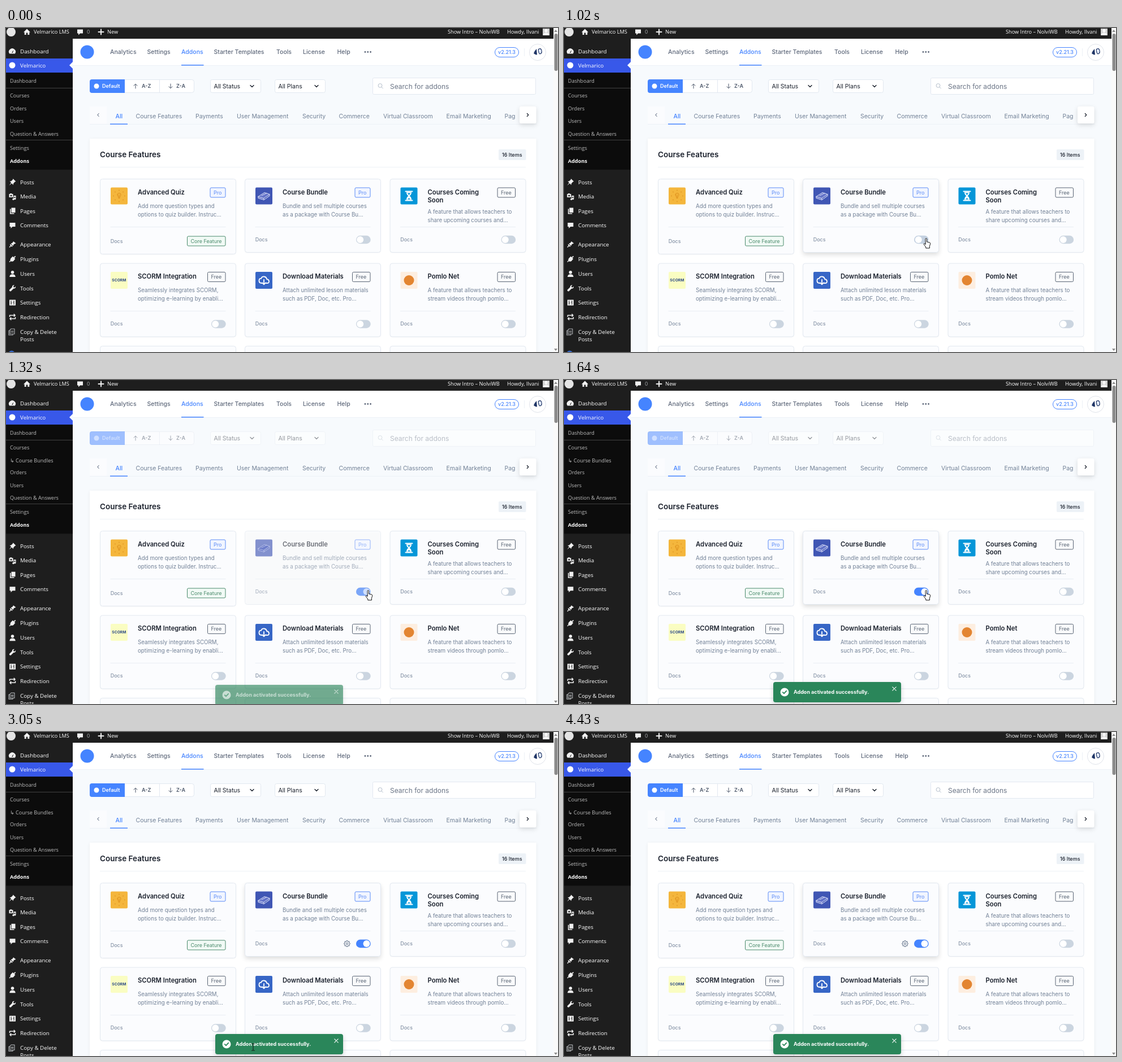
Animation, 976 px wide and 574 px high, one loop 4.5 s. Source, as an HTML page with a canvas:

```html
<!DOCTYPE html>
<html lang="en">
<head>
<meta charset="utf-8">
<title>Addons</title>
<style>
html, body { margin: 0; width: 100%; height: 100%; overflow: hidden; background: #f7fafd; }
canvas { display: block; width: 976px; height: 574px; }
</style>
</head>
<body>
<canvas id="stage"></canvas>
<script>
const W = 976, H = 574, LOOP = 4500;
const INTER = 'Inter, "Liberation Sans", sans-serif';
const ADMIN = '"Open Sans", "Noto Sans", sans-serif';
const BLUE = '#4584ff', INK = '#1a202c', GRAY = '#718096', LINE = '#e2e8f0', OFF = '#cbd5e0';

const canvas = document.getElementById('stage');
const dpr = window.devicePixelRatio || 1;
canvas.width = W * dpr;
canvas.height = H * dpr;
const g = canvas.getContext('2d');

const clamp = v => Math.max(0, Math.min(1, v));
const ramp = (t, from, to) => clamp((t - from) / (to - from));
const smooth = p => p * p * (3 - 2 * p);

// y is the middle of the capital letters
function text(s, x, y, size, color, weight = 400, family = INTER) {
  g.font = `${weight} ${size}px ${family}`;
  g.fillStyle = color;
  g.fillText(s, x, y + size * 0.36);
}
const admin = (s, x, y, size = 9.8, color = '#fff', weight = 400) =>
  text(s, x, y, size, color, weight, ADMIN);

function rect(x, y, w, h, fill) {
  g.fillStyle = fill;
  g.fillRect(x, y, w, h);
}
function box(x, y, w, h, r, fill, stroke) {
  g.beginPath();
  g.roundRect(x, y, w, h, r);
  if (fill) { g.fillStyle = fill; g.fill(); }
  if (stroke) { g.strokeStyle = stroke; g.lineWidth = 1; g.stroke(); }
}
function disc(x, y, r, fill, stroke) {
  g.beginPath();
  g.arc(x, y, r, 0, Math.PI * 2);
  if (fill) { g.fillStyle = fill; g.fill(); }
  if (stroke) { g.strokeStyle = stroke; g.lineWidth = 1; g.stroke(); }
}
function path(d, x, y, fill, stroke, width = 1) {
  const p = new Path2D(d);
  g.save();
  g.translate(x, y);
  g.lineJoin = g.lineCap = 'round';
  if (fill) { g.fillStyle = fill; g.fill(p, 'evenodd'); }
  if (stroke) { g.strokeStyle = stroke; g.lineWidth = width; g.stroke(p); }
  g.restore();
}
function shadow(color, blur, dy) {
  g.shadowColor = color;
  g.shadowBlur = blur * dpr;
  g.shadowOffsetY = dy * dpr;
}
function group(alpha, draw) {
  g.save();
  g.globalAlpha *= alpha;
  draw();
  g.restore();
}

const ICON = {
  gauge: 'M-5 4.5A6 6 0 1 1 5 4.5ZM-.8 2.5L2.5-2L.8 3Z',
  home: 'M0-5.5L6 .5H4.3V5H1.3V1.5H-1.3V5H-4.3V.5H-6Z',
  pin: 'M1-6L6-1L4.2-.4L1.6 2.6L1.4 5L-1.3 2.3L-6 6L-2.3 1.3L-5-1.4L-2.6-1.6L.4-4.2Z',
  media: 'M-6-4.5H-4.5L-4-5.5H-1.5L-1-4.5H1V1.5H-6ZM-4-1.5a1.5 1.5 0 1 0 3 0a1.5 1.5 0 1 0-3 0M2-1.5H6V4A1.6 1.6 0 1 1 4.8 2.6V.5H3V5A1.6 1.6 0 1 1 1.8 3.4Z',
  pages: 'M-2-5.5H5V3H-2ZM-4.5-3.5H-3V4H3V5.5H-4.5Z',
  comment: 'M-5-4.5H5V2.5H0L-3 5.5V2.5H-5Z',
  brush: 'M1.5-5.5L6-2L2.5-.5L1 2.5L-3-1.5L0-3ZM-3.6-.8L.4 3.2L-1.2 4L-2.6 3L-5 5.6L-6 4.6L-3.6 2L-4.6 .6Z',
  plug: 'M-1-3.5L.5-5L2-3.2L4.6-5.8L5.8-4.6L3.2-2L5-.5L3.5 1L2 3.2Q-1 5-3 3.6L-5 5.6L-6 4.6L-3.9 2.6Q-4.6-.5-1-3.5Z',
  user: 'M-2.8-2.8a2.8 2.8 0 1 1 5.6 0a2.8 2.8 0 1 1-5.6 0M-5.2 5.5Q-5.2 .8 0 .8T5.2 5.5Z',
  wrench: 'M5.6-3.2L3.2-1L1.2-3L3.4-5.5Q-.6-6.2-.8-1.8L-5.6 3Q-6 5.8-3 5.4L1.8 .8Q6.2 .6 5.6-3.2Z',
  sliders: 'M-5.5-5H5.5V5H-5.5ZM-3-3.5V3.5H-2V1H-1V0H-2V-3.5ZM2-3.5V-1H1V0H2V3.5H3V-3.5Z'
};
const LOOP_ARROWS = 'M-5-.5V-3H4M2.6-5L4.6-3L2.6-1M5 .5V3H-4M-2.6 1L-4.6 3L-2.6 5';
const SHEETS = 'M-1-6H5V3H-3V-4ZM-3-3H-5V5H2V3M-1-2H3M-1 0H3';
const CHEVRON = { down: 'M-3-1.5L0 1.5L3-1.5', left: 'M1.2-2.6L-1.2 0L1.2 2.6', right: 'M-1.2-2.6L1.2 0L-1.2 2.6' };

function adminBar() {
  rect(0, 0, 968, 19, '#1e1e1e');
  disc(9, 7, 8, '#e4e4e4');
  path(ICON.home, 37, 7, '#f0f0f0');
  admin('Velmarico LMS', 49, 7, 9.2);
  path(ICON.comment, 131, 7, '#f0f0f0');
  admin('0', 143, 7, 9.2, '#a7aaad');
  path('M-4.5 0H4.5M0-4.5V4.5', 168, 7, null, '#f0f0f0', 2);
  admin('New', 179, 7, 9.2);
  admin('Show Intro – NolviWB', 781, 7, 9.2);
  admin('Howdy, Ilvani', 886, 7, 9.2);
  rect(949, 1, 12, 12, '#d2d2d2');
  path(ICON.user, 955, 7.5, '#f8f8f8');
}

const MENU = [
  ['Posts', 273, 'pin'], ['Media', 298.5, 'media'], ['Pages', 324, 'pages'], ['Comments', 349.5, 'comment'],
  ['Appearance', 383.5, 'brush'], ['Plugins', 409.5, 'plug'], ['Users', 435.5, 'user'],
  ['Tools', 461, 'wrench'], ['Settings', 486.5, 'sliders']
];

function sidebar(extra) {
  const dy = extra ? 21.3 : 0;
  rect(0, 19, 118, H - 19, '#1e1e1e');
  path(ICON.gauge, 11, 41, '#f0f0f0');
  admin('Dashboard', 25, 41);
  rect(0, 54, 118, 25, '#3858e9');
  disc(11, 66, 5.5, '#fff');
  admin('Velmarico', 25, 66.5);
  path('M0-6V6L-6 0Z', 118, 66, '#f7fafd');

  rect(0, 79, 118, 172 + dy, '#0c0c0c');
  rect(0, 106, 118, 1, '#414141');
  rect(0, Math.round(198 + dy), 118, 1, '#414141');
  const sub = (s, y) => admin(s, 7, y, 9.1, '#bcbcbc');
  sub('Dashboard', 94);
  sub('Courses', 120);
  if (extra) sub('↳ Course Bundles', 142.5);
  sub('Orders', 142.5 + dy);
  sub('Users', 165 + dy);
  sub('Question & Answers', 187.5 + dy);
  sub('Settings', 212.5 + dy);
  admin('Addons', 7, 235.5 + dy, 9.1, '#fff', 700);

  for (const [label, y, icon] of MENU) {
    path(ICON[icon], 11.5, y + dy, '#f0f0f0');
    admin(label, 25, y + dy);
  }
  path(LOOP_ARROWS, 11.5, 512 + dy, null, '#f0f0f0', 1.5);
  admin('Redirection', 25, 512 + dy);
  path(SHEETS, 10, 539 + dy, null, '#a7aaad', 1.2);
  admin('Copy & Delete', 25, 538 + dy);
  admin('Posts', 25, 551.5 + dy);
  disc(10, 577 + dy, 5.5, '#3567c9');
  admin('Profile Allowed', 25, 577.5 + dy);
}

function header() {
  rect(118, 19, 850, 48, '#fff');
  rect(118, 66, 850, 1, '#edf1f6');
  disc(143.5, 42.5, 12, BLUE);
  const nav = [['Analytics', 184], ['Settings', 249.5], ['Addons', 310], ['Starter Templates', 367.5],
    ['Tools', 478], ['License', 525], ['Help', 585.5]];
  for (const [s, x] of nav) text(s, x, 42.5, 10.5, s === 'Addons' ? BLUE : '#5f697b', 500);
  rect(310, 65, 39.5, 1.5, BLUE);
  for (let i = 0; i < 3; i++) disc(635 + i * 4.8, 42.5, 1.4, '#5f697b');
  box(864.5, 34.5, 42, 17, 8.5, '#fff', BLUE);
  text('v2.21.3', 870, 42.5, 9, BLUE, 500);
  rect(916, 36, 1, 14, '#edf1f6');
  disc(940, 43, 14.5, '#fff', '#dfe3ea');
  path('M-7 3Q-6-1-2-5L-1 5.5L-4 5Z', 940, 42, '#1f3566');
  path('M2-4.5Q6-7 7-2T4 4Q2 3 1.5-1T2-4.5Z', 940, 42, '#e8f0ff', '#1f3566', 1.2);
}

function filters(sort, field) {
  group(sort, () => {
    box(148.5, 91.5, 184, 23, 4, '#fff', LINE);
    rect(271, 92, 1, 23, LINE);
    box(148, 91, 62, 24, [4, 0, 0, 4], BLUE);
    disc(160, 103, 4.5, '#fff');
    text('Default', 170, 103, 9, '#fff', 600);
    path('M0 4V-3.5M-3-.8L0-3.8L3-.8', 229, 103, null, '#4a5568');
    text('A-Z', 240, 103, 9, '#4a5568', 600);
    path('M0-4V3.5M-3 .8L0 3.8L3 .8', 291, 103, null, '#4a5568');
    text('Z-A', 301, 103, 9, '#4a5568', 600);
  });
  group(field, () => {
    for (const [s, x] of [['All Status', 361], ['All Plans', 475]]) {
      box(x + 0.5, 91.5, 89, 23, 3, '#fff', LINE);
      text(s, x + 6.5, 103, 10.5, INK);
      path(CHEVRON.down, x + 74, 103, null, INK, 1.4);
    }
    box(648.5, 88.5, 288, 29, 2, '#fff', LINE);
    disc(661.5, 102, 3.4, null, '#b4becb');
    path('M0 0L2.4 2.4', 664, 104.6, null, '#b4becb');
    text('Search for addons', 679, 103.5, 12, '#6c7687');
  });
}

function tabs() {
  rect(148, 170, 790, 1, '#edf1f6');
  rect(148, 139, 30, 31, '#fbfcfe');
  path(CHEVRON.left, 163, 154, null, '#8a94a4', 1.2);
  text('All', 193.5, 156.5, 10.5, BLUE, 500);
  rect(184, 169.5, 31, 1.5, BLUE);
  const names = [['Course Features', 229.5], ['Payments', 335], ['User Management', 408], ['Security', 524],
    ['Commerce', 588.5], ['Virtual Classroom', 667], ['Email Marketing', 778.5], ['Pag', 881.5]];
  for (const [s, x] of names) text(s, x, 156.5, 10.5, GRAY);
  g.save();
  shadow('rgba(0,0,0,.13)', 8, 3);
  box(908, 139, 29.5, 30, 3, '#fff');
  g.restore();
  path(CHEVRON.right, 922.5, 154, null, INK, 1.4);
}

function badge(s, right, y, w, color, fill) {
  box(right - w + 0.5, y + 0.5, w - 1, 17, 2, fill, color);
  text(s, right - w + 6.5, y + 9, 9, color);
}
const pro = (right, y) => badge('Pro', right, y, 28, '#5b8bf7', '#f1f5ff');
const free = (right, y) => badge('Free', right, y, 32.5, '#5a6575', '#f9fafb');

function toggle(x, y, on = 0) {
  box(x, y - 7.2, 25.7, 14.4, 7.2, OFF);
  if (on) group(on, () => box(x, y - 7.2, 25.7, 14.4, 7.2, BLUE));
  disc(x + 7.2 + on * 11.3, y, 6, '#fff');
}

const ART = {
  quiz(x, y) {
    path('M-3-2a3 3 0 1 1 6 0Q3 0 1 2V4H-1V2Q-3 0-3-2ZM0-2V2', x, y, null, '#dd8f1c');
    for (let i = 0; i < 8; i++) {
      const a = i * Math.PI / 4;
      disc(x + Math.cos(a) * 10, y + Math.sin(a) * 10, 1, '#e29a28');
    }
  },
  bundle(x, y) {
    path('M-10 1L1-6L10-3L0 4ZM-10 1V4L0 7V4M0 7L10 0V-3M-4-.5L5-5', x, y, '#6373c8', '#dbe0f7', 1);
  },
  hourglass(x, y) {
    path('M-6-8H6M-6 8H6', x, y, null, '#fff', 2);
    path('M-4.5-7Q-4.5-2-1 0Q-4.5 2-4.5 7H4.5Q4.5 2 1 0Q4.5-2 4.5-7ZM-2.8-5H2.8L0-1.5ZM-2.5 6Q0 2 2.5 6Z', x, y, '#fff');
  },
  scorm(x, y) { text('SCORM', x - 12.7, y, 6.7, '#2d4a86', 700); },
  cloud(x, y) {
    path('M-4 5H-5Q-9 4-8.5 0T-5-3Q-3.5-7 .5-6.5T5-2Q9-1.5 9 2T5 5H4M0-1V7M-3 4.3L0 7.3L3 4.3', x, y, null, '#fff', 1.8);
  },
  dot(x, y) { disc(x, y, 9, '#e38531'); }
};

const CARDS = [
  { x: 166, y: 267, h: 134, color: '#f4b63c', art: 'quiz', title: ['Advanced Quiz'], tag: pro,
    body: ['Add more question types and', 'options to quiz builder. Instruc...'] },
  { x: 422, y: 267, h: 131, color: '#4056b4', art: 'bundle', title: ['Course Bundle'], tag: pro,
    body: ['Bundle and sell multiple courses', 'as a package with Course Bu...'] },
  { x: 678.5, y: 267, h: 131, color: '#0596d8', art: 'hourglass', title: ['Courses Coming', 'Soon'], tag: free,
    body: ['A feature that allows teachers to', 'share upcoming courses and...'] },
  { x: 166, y: 416.5, h: 131, color: '#fafdc2', art: 'scorm', title: ['SCORM Integration'], tag: free,
    body: ['Seamlessly integrates SCORM,', 'optimizing e-learning by enabli...'] },
  { x: 422, y: 416.5, h: 131, color: '#3766c6', art: 'cloud', title: ['Download Materials'], tag: free,
    body: ['Attach unlimited lesson materials', 'such as PDF, Doc, etc. Pro...'] },
  { x: 678.5, y: 416.5, h: 131, color: '#fdeee0', art: 'dot', title: ['Pomlo Net'], tag: free,
    body: ['A feature that allows teachers to', 'stream videos through pomlo...'] }
];

function frame(x, y, h, lift = 0) {
  g.save();
  if (lift) shadow(`rgba(0,0,0,${0.14 * lift})`, 9, 4);
  else shadow('rgba(0,0,0,.04)', 2, 1);
  box(x + 0.5, y + 0.5, 240, h - 1, 4, '#fbfcfe');
  g.restore();
  box(x + 0.5, y + 0.5, 240, h - 1, 4, null, LINE);
}

function gear(x, y) {
  g.strokeStyle = '#64748b';
  g.lineWidth = 1.1;
  g.beginPath();
  for (let i = 0; i <= 48; i++) {
    const a = i / 48 * Math.PI * 2, r = 4.7 + 0.6 * Math.cos(a * 8);
    g.lineTo(x + Math.cos(a) * r, y + Math.sin(a) * r);
  }
  g.stroke();
  disc(x, y, 1.7, null, '#64748b');
}

function card(c, state) {
  const { x, y } = c, right = x + 222.5;
  frame(x, y, c.h, state && state.lift);
  box(x + 19, y + 15.5, 30, 30, 2, c.color);
  ART[c.art](x + 34, y + 30.5);
  c.tag(right, y + 15.5);
  c.title.forEach((s, i) => text(s, x + 67, y + 23.5 + i * 14.2, 11.25, INK, 600));
  const top = y + (c.title.length > 1 ? 58.8 : 48.4);
  c.body.forEach((s, i) => text(s, x + 67, top + i * 15, 9.75, GRAY));
  rect(x + 18.5, Math.round(y + 84.5), 204, 1, '#e9eef4');
  const foot = y + c.h - 23;
  text('Docs', x + 18.7, foot - 0.5, 9, GRAY);
  if (c.art === 'quiz') return badge('Core Feature', right, foot - 9.5, 68.5, '#4a8a6c', '#f1faf5');
  toggle(x + 197, foot, state ? state.on : 0);
  if (state && state.gear) gear(x + 181, foot);
}

function panel(state) {
  g.save();
  shadow('rgba(0,0,0,.06)', 6, 1);
  rect(148, 196, 789.5, 400, '#fff');
  g.restore();
  text('Course Features', 166, 224.5, 13.5, INK, 600);
  box(871, 215, 48.5, 19, 2, '#edf2f7');
  text('16 Items', 877, 224.5, 9, INK, 500);
  rect(166, 246, 753, 1, '#edf2f7');
  CARDS.forEach((c, i) => {
    if (i === 1) group(state.fade, () => card(c, state));
    else card(c);
  });
  for (const x of [166, 422, 678.5]) frame(x, 563, 60);
}

function toast(p) {
  if (!p) return;
  group(p, () => {
    g.translate(0, 13 * (1 - p));
    g.save();
    shadow('rgba(0,0,0,.18)', 8, 3);
    box(370, 535, 226, 36, 4, '#2a865a');
    g.restore();
    disc(390, 553, 7.5, '#fff');
    path('M-3.2 .2L-1 2.4L3.2-2.2', 390, 553, null, '#2a865a', 1.8);
    text('Addon activated successfully.', 406, 553, 9, '#fff', 700);
    path('M-3.2-3.2L3.2 3.2M3.2-3.2L-3.2 3.2', 584, 547, null, '#fff', 1.1);
  });
}

function scrollbar() {
  rect(968, 0, 8, H, '#fafafa');
  path('M-3 2H3L0-2Z', 972, 5, '#8b8b8b');
  box(969.5, 10, 6, 66, 3, '#8b8b8b');
  path('M-3-2H3L0 2Z', 972, 570, '#8b8b8b');
}

// time, x, y of the pointer's hot spot
const TRACK = [
  [70, 648, 451], [300, 640, 430], [530, 635.5, 400], [680, 640, 373], [2220, 640, 373], [2360, 611, 491],
  [2560, 530, 540], [2750, 437, 557], [3260, 437, 559], [3400, 482, 560], [3740, 530, 557],
  [3900, 536, 558], [4330, 545, 590]
];
const ARROW = 'M0 0V11.6L2.7 9.1L4.5 13.2L6.3 12.4L4.5 8.5H8.2Z';
const HAND = 'M-1 1.2Q-1-.4 .3-.4T1.6 1.2V6L6 6.8Q8 7.4 7.7 9.5L6.4 13.5V17H-.2V15L-3.6 10.7Q-4.4 9.2-3 8.7L-1 10.2Z';
const IBEAM = 'M-2.5-6H-.8L0-5.3L.8-6H2.5M0-5.3V5.3M-2.5 6H-.8L0 5.3L.8 6H2.5';

function pointer(t) {
  const i = TRACK.findIndex(k => k[0] > t);
  if (i < 1) return;
  const [t0, x0, y0] = TRACK[i - 1], [t1, x1, y1] = TRACK[i];
  const p = ramp(t, t0, t1), x = x0 + (x1 - x0) * p, y = y0 + (y1 - y0) * p;
  if (t >= 2330) path(IBEAM, x, y, null, '#16241d', 1.1);
  else path(t > 900 && t < 2250 ? HAND : ARROW, x, y, '#fff', '#111', 1);
}

function draw(t) {
  g.setTransform(dpr, 0, 0, dpr, 0, 0);
  rect(0, 0, W, H, '#f7fafd');
  const back = ramp(t, 1720, 1860);
  const busy = ramp(t, 1090, 1290) * (1 - back);
  const sort = t >= 1130 ? 1 - 0.5 * (1 - back) : 1;
  const pending = ramp(t, 1020, 1090) * (1 - ramp(t, 1330, 1480));

  adminBar();
  header();
  filters(sort, 1 - 0.55 * busy);
  tabs();
  panel({
    lift: ramp(t, 600, 760) * (1 - pending),
    fade: 1 - 0.36 * pending,
    on: smooth(ramp(t, 1000, 1150)),
    gear: t >= 1760
  });
  sidebar(t >= 1160);
  toast(smooth(ramp(t, 1090, 1490)));
  scrollbar();
  pointer(t);
}

let start;
function tick(now) {
  start ??= now;
  draw((now - start) % LOOP);
  requestAnimationFrame(tick);
}
requestAnimationFrame(tick);
</script>
</body>
</html>
```
